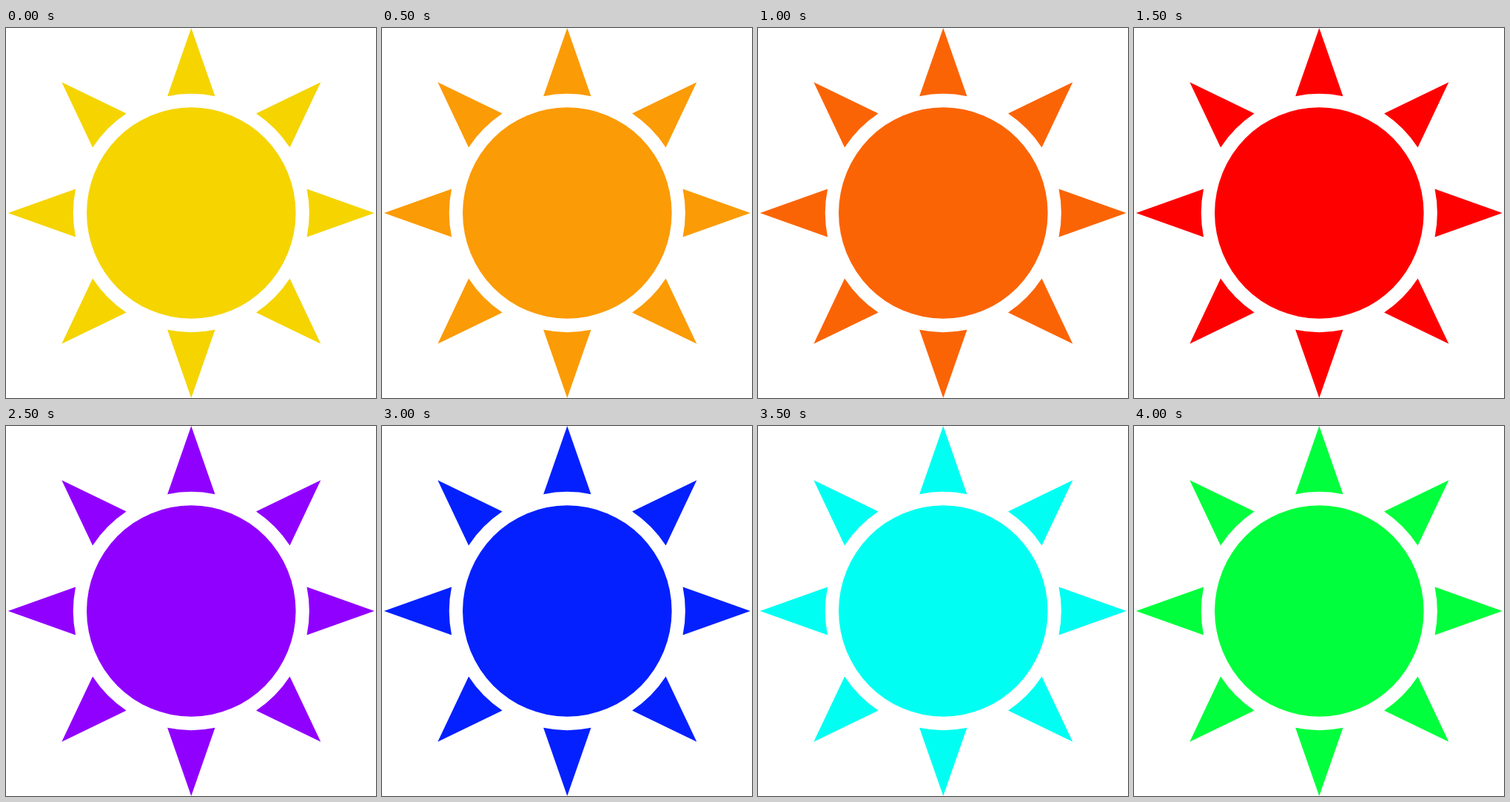
Animation of 500 by 500 pixels, one loop 4500 ms. Source, as an HTML page:

```html
<!DOCTYPE html>
<html lang="en">
<head>
<meta charset="utf-8">
<title>Colour-changing sun</title>
<style>
  html, body { margin: 0; width: 100%; height: 100%; overflow: hidden; background: #fff; }
  svg { display: block; width: 100%; height: 100%; }
</style>
</head>
<body>
<svg viewBox="0 0 500 500">
  <g id="sun" transform="translate(250.3 250) scale(.99 1)" fill="#f5d400">
    <circle r="142.7"/>
  </g>
</svg>
<script>
  const STEP = 500;
  const COLORS = [
    '#f5d400', '#fb9b05', '#fb6405', '#ff0000', '#ff00dc',
    '#9000ff', '#0420ff', '#00fff2', '#00ff3c'
  ];
  const RAYS = 8;
  const sun = document.getElementById('sun');

  // Each ray is a triangle whose base follows the white ring around the disc.
  for (let i = 0; i < RAYS; i++) {
    const ray = document.createElementNS(sun.namespaceURI, 'path');
    ray.setAttribute('d', 'M0-250L32.5-157.8A161 161 0 0 0-32.5-157.8Z');
    ray.setAttribute('transform', `rotate(${i * 360 / RAYS})`);
    sun.append(ray);
  }

  const start = performance.now();
  function draw() {
    const step = Math.floor((performance.now() - start) / STEP);
    sun.setAttribute('fill', COLORS[step % COLORS.length]);
    requestAnimationFrame(draw);
  }
  draw();
</script>
</body>
</html>
```
